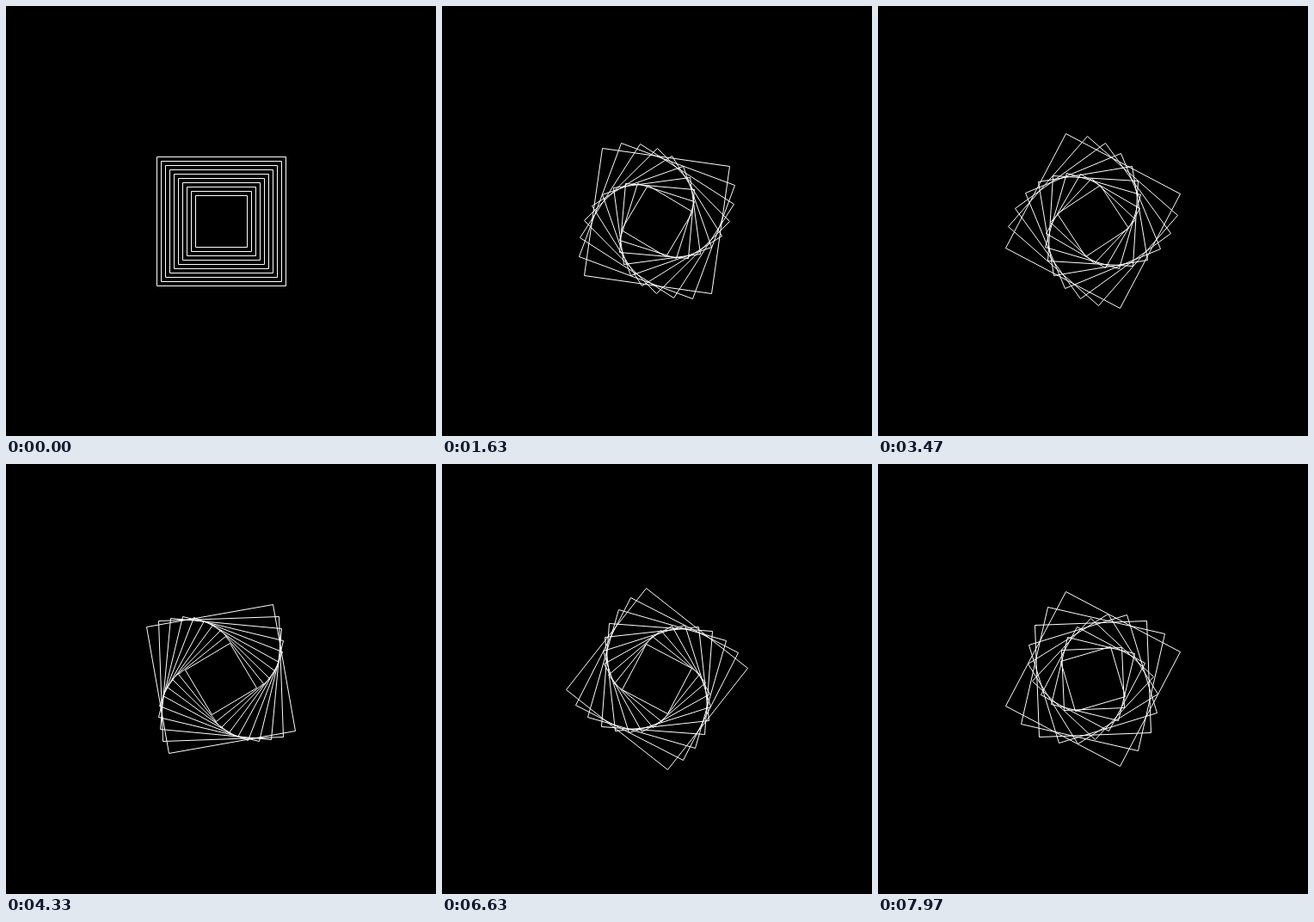
Recreate the animation shown at these times as an HTML page with a canvas. Size 500 px wide and 500 px high, loop 8 s.

```html
<!DOCTYPE html>
<html lang="en">
<head>
<meta charset="utf-8">
<title>Twisting squares</title>
<style>
  html, body { margin: 0; width: 100%; height: 100%; overflow: hidden; background: #000; }
  canvas { display: block; }
</style>
</head>
<body>
<canvas id="stage" width="500" height="500"></canvas>
<script>
const LOOP = 8000;
const CENTER = 250;
const COUNT = 10;
const DEG = Math.PI / 180;
const ctx = document.getElementById('stage').getContext('2d');
ctx.strokeStyle = '#fff';
ctx.lineWidth = 1;

// 30 steps per second, held for 30, 40 and 30 ms in turn.
function stepAt(ms) {
  const rest = ms % 100;
  return Math.floor(ms / 100) * 3 + (rest >= 30) + (rest >= 70);
}

// Corners sit on pixel centres, which keeps upright edges crisp.
const snap = v => Math.floor(v + 1e-6) + 0.5;

function square(side, degrees) {
  const radius = side * Math.SQRT1_2;
  ctx.beginPath();
  for (let k = 0; k < 4; k++) {
    const a = (degrees + 45 + 90 * k) * DEG;
    ctx.lineTo(snap(CENTER + radius * Math.cos(a)), snap(CENTER + radius * Math.sin(a)));
  }
  ctx.closePath();
  ctx.stroke();
}

function draw(ms) {
  const step = stepAt(ms % LOOP);
  const twist = 15 * Math.sin(step * 0.02);
  ctx.fillStyle = '#000';
  ctx.fillRect(0, 0, 500, 500);
  for (let i = 0; i < COUNT; i++) square(150 - 10 * i, 2 * step + i * twist);
}

function tick(now) {
  draw(now);
  requestAnimationFrame(tick);
}

draw(0);
requestAnimationFrame(tick);
</script>
</body>
</html>
```
